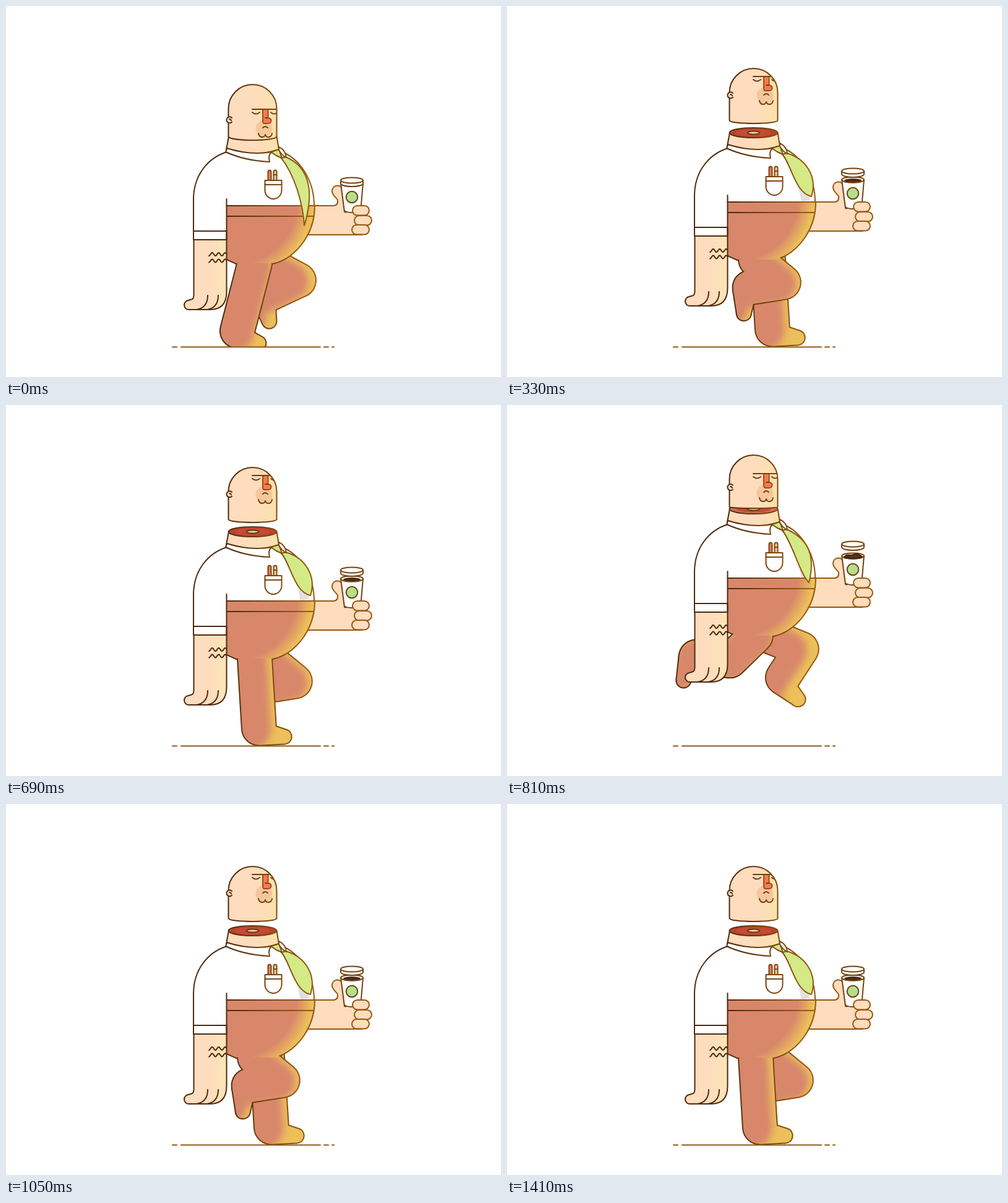
An HTML page with a canvas for the animation above (1440 ms loop, 800 px wide and 600 px high).

```html
<!DOCTYPE html>
<html lang="en">
<head>
<meta charset="utf-8">
<title>Jogging with coffee</title>
<style>
  html, body { margin: 0; width: 100%; height: 100%; overflow: hidden; background: #fff; }
  canvas { display: block; }
</style>
</head>
<body>
<canvas id="stage" width="800" height="600"></canvas>
<script>
const ctx = document.getElementById('stage').getContext('2d');
const layer = Object.assign(document.createElement('canvas'), { width: 800, height: 600 }).getContext('2d');

const SKIN = '#fedcbe', PANTS = '#d8876b', GOLD = '#ecc05a', GREEN = '#b4e08b', GROUND = 551.5;
const clamp = (v, lo, hi) => Math.min(hi, Math.max(lo, v));

function across(x0, x1, ...colors) {
  const g = ctx.createLinearGradient(x0, 0, x1, 0);
  colors.forEach((c, i) => g.addColorStop(i / (colors.length - 1), c));
  return g;
}
const INK = across(360, 480, '#4e2a0d', '#75430f', '#965910');
const CUP_INK = '#74420f';
const FACE = across(400, 440, SKIN, '#fbe2ac');
const HAND = across(325, 357, SKIN, '#fce5b8');
const TIE = across(440, 495, '#cfe986', '#d6ea86');

// Smooth periodic curve through (time, value) keys.
function track(period, times, values) {
  const n = times.length;
  const T = i => times[(i + n) % n] + period * Math.floor(i / n);
  const V = i => values[(i + n) % n];
  const rate = i => (V(i + 1) - V(i)) / (T(i + 1) - T(i));
  const slope = i => {
    const before = T(i) - T(i - 1), after = T(i + 1) - T(i);
    return (after * rate(i - 1) + before * rate(i)) / (before + after);
  };
  return time => {
    const t = ((time % period) + period) % period;
    let i = n - 1;
    while (times[i] > t) i--;
    const h = T(i + 1) - T(i), u = (t - T(i)) / h, v = 1 - u;
    return V(i) * v * v * (1 + 2 * u) + V(i + 1) * u * u * (3 - 2 * u)
      + h * u * v * (v * slope(i) - u * slope(i + 1));
  };
}

const step = (...values) => track(360, [0, 90, 210, 330], values);
const stride = (...values) => track(720, [0, 90, 210, 330, 360, 450, 570, 690], values);

const waistY = step(323, 280, 271, 317);
const neckGap = step(0, 3, 30, 20);
const headTilt = step(6, 2, -6, 5);
const browY = step(41, 31, 16, 14);
const lidLift = step(0, 14, 27, 9);
const splash = step(0, 5, 20, 0);
const thighAngle = stride(-14.4, -46, -7, 50.6, 61.6, 68, 27.7, 3.5);
const shinAngle = stride(-14.4, -96, -126, -81, -65, -33, 27.7, 3.5);
const tiePoints = [
  [466, 460, 470, 459], [-50, -60, -70, -62],
  [480, 474, 458, 466], [-5, -5, -33, -14],
  [482, 488, 497, 492], [32, 7, -42, -9],
  [498, 498, 486, 502], [-20, -33, -47, -40],
  [492, 490, 504, 484], [-62, -62, -72, -70]
].map(keys => step(...keys));

function draw(d, fill, stroke = INK, width = 2) {
  const path = new Path2D(d);
  if (fill) { ctx.fillStyle = fill; ctx.fill(path); }
  if (stroke) { ctx.strokeStyle = stroke; ctx.lineWidth = width; ctx.stroke(path); }
}
const line = (d, stroke) => draw(d, null, stroke);

function oval(x, y, rx, ry, fill, stroke = INK) {
  ctx.beginPath();
  ctx.ellipse(x, y, rx, ry, 0, 0, Math.PI * 2);
  if (fill) { ctx.fillStyle = fill; ctx.fill(); }
  if (stroke) { ctx.strokeStyle = stroke; ctx.lineWidth = 2; ctx.stroke(); }
}

function at(dy, paint) {
  ctx.save();
  ctx.translate(0, dy);
  paint();
  ctx.restore();
}

function leg(x, y, phase) {
  const thigh = thighAngle(phase), shin = Math.min(thigh, shinAngle(phase));
  const dir = deg => [Math.sin(deg * Math.PI / 180), Math.cos(deg * Math.PI / 180)];
  const go = (p, d, len) => [p[0] + d[0] * len, p[1] + d[1] * len];
  const down = dir(shin);
  const hip = [x, y], knee = go(hip, dir(thigh), 58), heel = go(knee, down, 55);
  const toe = go(heel, dir(shin + 68), 43);
  toe[1] = Math.min(toe[1], GROUND - 6);

  const trace = (c, grow, color, toeSize = 1) => {
    c.strokeStyle = c.fillStyle = color;
    c.lineCap = c.lineJoin = 'round';
    const limb = (width, ...points) => {
      c.lineWidth = width;
      c.beginPath();
      points.forEach(p => c.lineTo(...p));
      c.stroke();
    };
    limb(2 * (28 + grow), hip, knee, heel);
    if (toeSize < 0.05) return;
    limb(2 * (12 + grow) * toeSize, heel, toe);
    c.beginPath();
    [heel, go(heel, down, 28 + grow), go(toe, down, (12 + grow) * toeSize), toe].forEach(p => c.lineTo(...p));
    c.fill();
  };

  layer.clearRect(0, 0, 800, 600);
  trace(layer, -1, GOLD);
  layer.save();
  layer.globalCompositeOperation = 'source-atop';
  layer.filter = 'blur(6px)';
  layer.translate(-clamp(10 + thigh * 0.25 + shin * 0.15, 2, 22), 2);
  trace(layer, 3, PANTS, clamp(0.7 - (toe[0] - heel[0]) / 40, 0, 1));
  layer.restore();

  ctx.save();
  ctx.beginPath();
  ctx.rect(0, 0, 800, GROUND);
  ctx.clip();
  trace(ctx, 1, INK);
  ctx.drawImage(layer.canvas, 0, 0);
  ctx.restore();
}

function armWithCup(t) {
  draw('M480 0H530Q537 -1 536 -9C534 -14 527 -16 527 -24A8.5 8.5 0 0 1 543 -28L549 0H575V47H470V0Z', SKIN);
  draw('M541 -36L547 10Q559 13 573 10L577 -36A18 4.5 0 0 1 541 -36Z', '#fff', CUP_INK);
  oval(559, -36, 18, 4.5, '#fff', CUP_INK);
  oval(559, -35, 14, 3, '#4c2a14', null);
  const s = Math.max(0, splash(t));
  if (s > 0.5) at(-35, () => draw(
    `M545 1Q547 ${-0.75 * s} 556 ${-0.45 * s}Q561 ${-0.5 * s} 562 ${-0.85 * s}` +
    `Q568 ${-1.2 * s} 569 ${-0.5 * s}Q574 ${-0.1 * s} 574 1Q559 6 545 1Z`, '#54301a', '#43240f'));
  at(-41 - Math.max(0, lidLift(t)), () => {
    draw('M541 0V5A18 5 0 0 0 577 5V0Z', '#fff', CUP_INK);
    oval(559, 0, 18, 4.5, '#fff', CUP_INK);
  });
  oval(559, -14, 9.3, 9.3, GREEN, CUP_INK);
  draw('M550 10H566V46H550Z', SKIN, null);
  line('M547 8Q549 11 561 11', CUP_INK);
  [[560, 0, 27], [563, 16, 28], [559, 31, 28]].forEach(([x, y, w]) => {
    ctx.beginPath();
    ctx.roundRect(x, y, w, 15.5, 7.7);
    ctx.fillStyle = SKIN;
    ctx.fill();
    ctx.strokeStyle = INK;
    ctx.stroke();
  });
}

const TROUSERS = 'M356.5 0H498C498 50 462 88 430 93H372L356.5 86Z';

function trousers() {
  const shade = ctx.createRadialGradient(365, -10, 106, 365, -10, 131);
  shade.addColorStop(0, PANTS);
  shade.addColorStop(1, GOLD);
  draw(TROUSERS, shade, null);
  line('M356.5 17H496');
}

function shirt() {
  draw('M357 -87C325 -77 303 -48 303 -10V55H356.5V0H498C498 -40 476 -76 444 -88Z', '#fff', null);
  draw('M445 -76C466 -50 472 -20 476 0L489 -3C492 -40 480 -62 452 -78Z', '#e3e0e2', null);
  line('M357 -87C325 -77 303 -48 303 -10V55');
  line('M356.5 0H498C498 -40 476 -76 444 -88');
}

function tie(t) {
  const [ax, ay, bx, by, tx, ty, cx, cy, dx, dy] = tiePoints.map(f => f(t).toFixed(2));
  draw(`M445 -77C${ax} ${ay} ${bx} ${by} ${tx} ${ty}C${cx} ${cy} ${dx} ${dy} 452 -79Z`, TIE);
  draw('M428 -87L441 -91L446 -77L437 -81Z', TIE);
}

function collarAndPocket() {
  draw('M441 -95Q452 -90 453 -78Q446 -81 441 -90Z', '#fff');
  draw('M357 -93Q395 -81 429 -87Q423 -81 426 -71Q385 -73 355 -87Z', '#fff');
  draw('M423.5 -41V-55A2.5 2.5 0 0 1 428.5 -55V-41Z', '#e8805f');
  draw('M432.5 -41V-55A2.5 2.5 0 0 1 437.5 -55V-41Z', '#f6cf9a');
  line('M432.5 -50H437.5');
  draw('M418.5 -41H445.5V-25A13.5 14 0 0 1 418.5 -25Z', '#fff');
  line('M418.5 -34H445.5');
}

function nearArm() {
  draw('M303.5 55V145C303 153 299 151 295 153A7.5 7.5 0 0 0 296 168H330Q356.5 168 356.5 139V55Z', HAND);
  line('M326 145Q326 165 308 168M343 145Q343 165 325 168');
  draw('M303 41H356.5V55H303Z', '#fff');
  line('M356.5 -11V55');
  for (const y of [78.5, 89]) {
    ctx.beginPath();
    for (let x = 328; x <= 356; x++) ctx.lineTo(x, y + 2.6 * Math.cos((x - 328) * Math.PI * 2 / 10.5));
    ctx.stroke();
  }
}

// Cross-section shown on the neck and under the head.
function slice(y, ry, light) {
  oval(398.5, y, 39, ry, '#b8432e', null);
  ctx.globalAlpha = light;
  oval(398.5, y, 39, ry, SKIN, null);
  ctx.globalAlpha = 1;
  oval(398.5, y, 28, ry * 0.7, light > 0.7 ? '#f28376' : '#c64a34', null);
  oval(398.5, y, 10, ry * 0.3, light > 0.7 ? '#fff' : '#f1d6a8');
  oval(398.5, y, 39, ry);
}

function neck(gap, light) {
  draw('M360 -112L356 -91Q398 -77 441 -91L437.5 -112Z', FACE);
  slice(-112, 6 + Math.min(2, gap), light);
}

function head(t, tilt, light) {
  const ry = Math.max(0.1, Math.abs(tilt)), brow = browY(t), ear = 37 + 0.52 * brow;
  const outline = `M359.5 85V40A39 39 0 0 1 437.5 40V85A39 ${ry} 0 0 1 359.5 85Z`;
  draw(outline, FACE, null);
  ctx.save();
  ctx.clip(new Path2D(outline));
  ctx.translate(0, brow);
  oval(417, 31, 13.5, 13.5, 'rgba(232,165,120,.42)', null);
  draw('M415 0H423.5V14Q429 15 428.5 19Q428 23 423 23H418Q415 23 415 19Z', '#f47b50', '#a04a1c');
  line('M423.5 14H419');
  line('M398 0H440M398 5Q404 10 410 5M428 5Q433 10 440 5');
  line('M415 30Q419 26 423 30M408 39Q409 45 414 45Q418 45 419 41Q420 45 424 45Q429 45 430 39');
  ctx.restore();
  if (tilt < 0) slice(85, ry, light * 0.6 + 0.3);
  line(outline);
  draw(`M365 ${ear - 3.5}A5 5 0 1 0 365 ${ear + 3.5}`, SKIN);
  line(`M361 ${ear - 1}Q363 ${ear - 2} 364 ${ear + 1}`);
}

function render(t) {
  const w = waistY(t), gap = Math.max(0, neckGap(t)), tilt = headTilt(t);
  const light = clamp((5 - tilt) / 11, 0, 1);
  ctx.clearRect(0, 0, 800, 600);
  ctx.lineCap = ctx.lineJoin = 'round';
  leg(422, w + 93, t + 360);
  at(w, () => {
    armWithCup(t);
    draw(TROUSERS, null, INK, 4);
  });
  leg(402, w + 93, t);
  at(w, () => {
    trousers();
    shirt();
    neck(gap, light);
    tie(t);
    collarAndPocket();
    nearArm();
  });
  at(w - 197 - gap, () => head(t, tilt, light));
  line(`M269 ${GROUND}H276M283 ${GROUND}H508M514 ${GROUND}H521M527 ${GROUND}H530`, '#8f5810');
}

const start = performance.now();
function tick() {
  const t = (performance.now() - start) % 1440;
  render(Math.floor(t / 30) * 30);
  requestAnimationFrame(tick);
}
tick();
</script>
</body>
</html>
```
